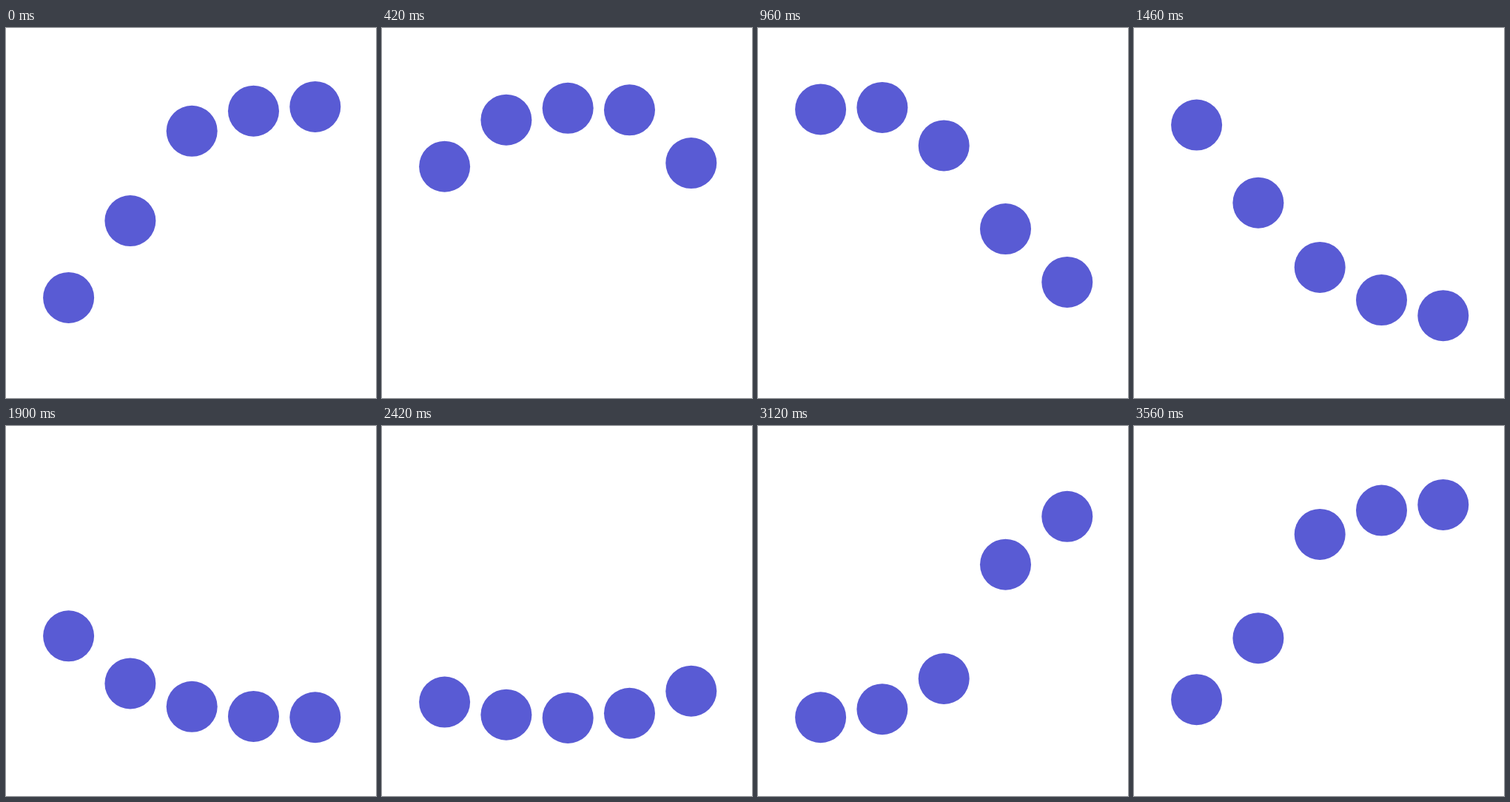
An HTML page that plays this animation: 500x500 px, repeating every 3580 ms.

```html
<!DOCTYPE html>
<html lang="en">
<head>
<meta charset="utf-8">
<title>Bouncing dots</title>
<style>
  html, body { margin: 0; width: 100%; height: 100%; overflow: hidden; background: #fff; }
  svg { display: block; width: 100%; height: 100%; }
</style>
</head>
<body>
<svg viewBox="0 0 500 500" fill="#595bd4"></svg>
<script>
const LOOP = 3580, STEP = 20, CYCLE = 3600, HALF = 1800, LAG = 300;
const TOP = 106.4, BOTTOM = 394.5, COUNT = 5;
const svg = document.querySelector('svg');

const dots = Array.from({ length: COUNT }, (_, i) => {
  const dot = document.createElementNS('http://www.w3.org/2000/svg', 'circle');
  dot.setAttribute('cx', 84.6 + i * 83.3);
  dot.setAttribute('r', 34.5);
  return svg.appendChild(dot);
});

// Cubic bezier easing with flat ends: (x1, 0, x2, 1)
function ease(x1, x2, p) {
  let lo = 0, hi = 1;
  for (let i = 0; i < 24; i++) {
    const s = (lo + hi) / 2, r = 1 - s;
    const x = 3 * r * r * s * x1 + 3 * r * s * s * x2 + s * s * s;
    if (x < p) lo = s; else hi = s;
  }
  return lo * lo * (3 - 2 * lo);
}

const fall = p => ease(0.333, 0.22, p);
const rise = p => ease(0.788, 0.233, p);

function height(i, time) {
  const lag = (COUNT - 1 - i) * LAG;
  const u = (time - lag + CYCLE) % CYCLE;
  const down = lag ? HALF : HALF - STEP; // the leading dot drops a little sooner
  const depth = u < down ? fall(u / down) : 1 - rise(Math.min(1, (u - down) / HALF));
  return TOP + (BOTTOM - TOP) * depth;
}

function draw(now) {
  const time = Math.floor((now % LOOP) / STEP) * STEP;
  dots.forEach((dot, i) => dot.setAttribute('cy', height(i, time).toFixed(2)));
}

let start = null;
function tick(now) {
  if (start === null) start = now;
  draw(now - start);
  requestAnimationFrame(tick);
}
draw(0);
requestAnimationFrame(tick);
</script>
</body>
</html>
```
